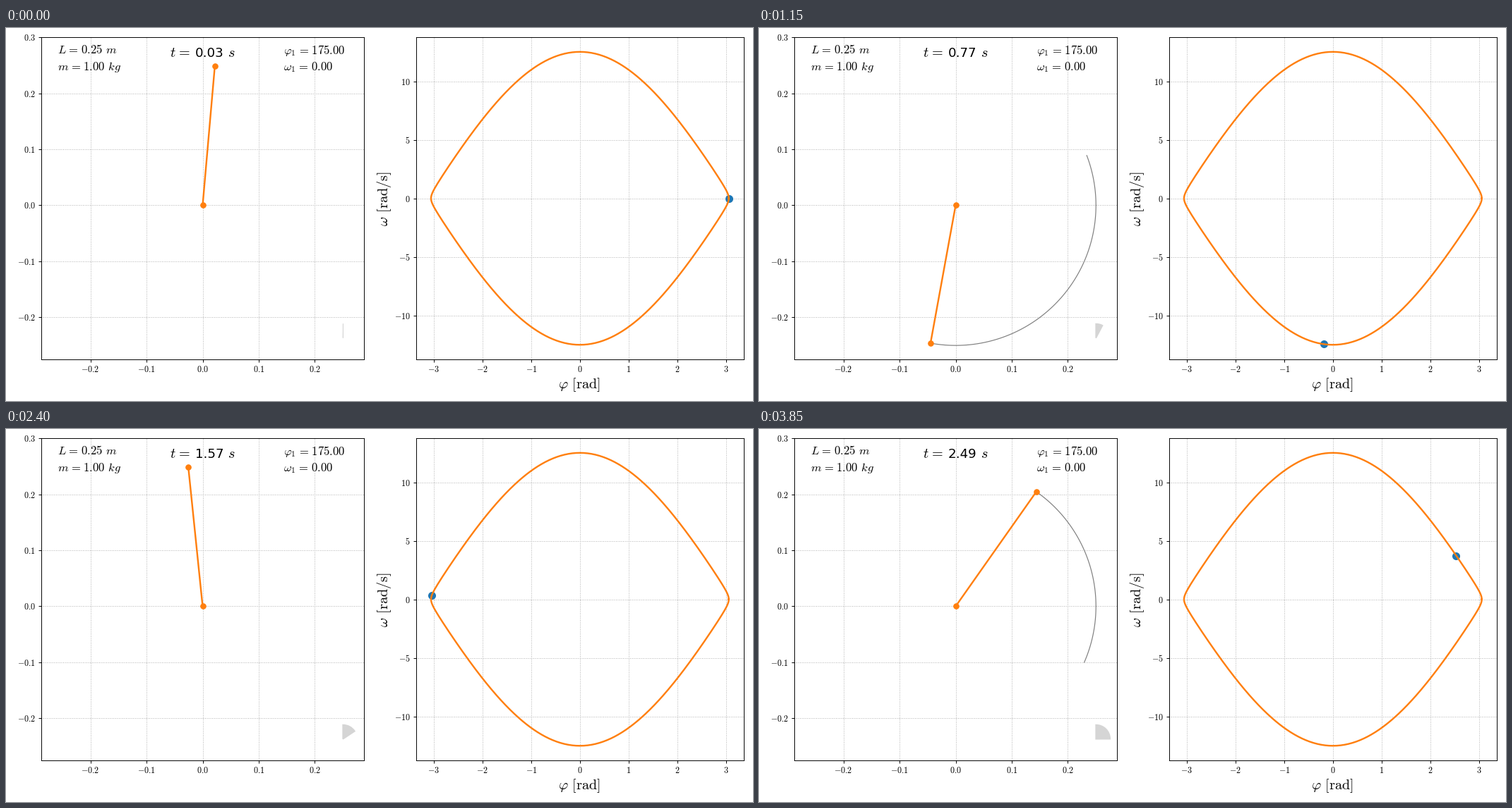
Recreate the animation shown at these times as a matplotlib script. Size 1058 px wide and 529 px high, loop 3.9 s.

```python
import numpy as np
import matplotlib.pyplot as plt
from matplotlib.animation import FuncAnimation
from matplotlib.patches import Wedge

W, H, DPI = 1058, 529, 64
FRAMES, INTERVAL = 78, 50
STEP, LEAD, TRAIL = 0.032, 0.03, 0.201  # seconds of simulated time
L, G, PHI0 = 0.25, 9.81, np.radians(175)
ORANGE, BLUE = "#ff7f0e", "#1f77b4"
EQ = r"\hspace{0.116}=\hspace{0.116}"
GAP = r"\hspace{0.38}"


def px(v):
    """Pixels to points."""
    return v * 72 / DPI


def swing(t_end, dt=0.001):
    """Pendulum angle and angular speed by Runge-Kutta steps."""
    def rate(s):
        return np.array([s[1], -G / L * np.sin(s[0])])

    t = np.arange(0, t_end + dt, dt)
    states = np.empty((len(t), 2))
    s = np.array([PHI0, 0.0])
    for n in range(len(t)):
        states[n] = s
        k1 = rate(s)
        k2 = rate(s + dt / 2 * k1)
        k3 = rate(s + dt / 2 * k2)
        k4 = rate(s + dt * k3)
        s = s + dt / 6 * (k1 + 2 * k2 + 2 * k3 + k4)
    return t, states[:, 0], states[:, 1]


def tip(phi):
    return L * np.sin(phi), -L * np.cos(phi)


plt.rcParams["mathtext.fontset"] = "cm"
fig = plt.figure(figsize=(W / DPI, H / DPI), dpi=DPI, facecolor="white")


def label(x, y, s, size, **kw):
    """Text with its baseline at stage pixel (x, y)."""
    return fig.text(x / W, 1 - y / H, s, fontsize=px(size),
                    va=kw.pop("va", "baseline"), **kw)


def formula(x, y, s, size, **kw):
    return label(x, y, f"${s}$", size, **kw)


def make_axes(x0, x1, xlim, ylim, xticks, yticks, fmt):
    top, bottom = 13.05, 470.06
    ax = fig.add_axes([x0 / W, 1 - bottom / H, (x1 - x0) / W, (bottom - top) / H])
    ax.set_xlim(xlim)
    ax.set_ylim(ylim)
    ax.set_xticks(xticks, [f"${v:{fmt}}$" for v in xticks])
    ax.set_yticks(yticks, [f"${v:{fmt}}$" for v in yticks])
    ax.tick_params(length=px(4.2), pad=px(4.2), width=px(0.96), labelsize=px(12))
    ax.grid(linestyle=":", linewidth=px(0.96), color="#b0b0b0")
    ax.set_axisbelow(True)
    for spine in ax.spines.values():
        spine.set_linewidth(px(0.96))
    return ax


w_max = np.sqrt(2 * G / L * (1 - np.cos(PHI0)))
left = make_axes(49.95, 507.05, (-0.2875, 0.2875), (-0.275, 0.3),
                 [k / 10 for k in range(-2, 3)],
                 [k / 10 for k in range(-2, 4)], ".1f")
right = make_axes(580.9, 1044.8, (-1.1 * PHI0, 1.1 * PHI0),
                  (-1.1 * w_max, 1.1 * w_max),
                  list(range(-3, 4)), list(range(-10, 11, 5)), "d")

formula(72.6, 36.5, "L" + EQ + "0.25" + GAP + "m", 16.6)
formula(72.6, 59.7, "m" + EQ + "1.00" + GAP + "kg", 16.6)
formula(393, 36.5, r"\varphi_1" + EQ + "175.00", 16.6)
formula(393, 59.7, r"\omega_1" + EQ + "0.00", 16.6)
formula(812, 510.7, r"\varphi" + GAP + r"\mathrm{[rad]}", 20.2, ha="center")
formula(547.5, 242, r"\omega" + GAP + r"\mathrm{[rad/s]}", 20.4,
        ha="right", va="center", rotation=90)
formula(232, 40.6, "t" + EQ, 20.2)
formula(314.2, 40.6, "s", 20.2)
clock = label(288, 40.6, "", 18.2, ha="center", family="DejaVu Sans")

# Closed orbit of constant energy
a = np.linspace(0, 2 * np.pi, 721)
orbit = PHI0 * np.cos(a)
speed = np.sqrt(np.maximum(0, 2 * G / L * (np.cos(orbit) - np.cos(PHI0))))
right.plot(orbit, np.sign(np.sin(a)) * speed, color=ORANGE, lw=px(2.4), zorder=2)
dot, = right.plot([], [], "o", color=BLUE, ms=px(10), mew=px(1), zorder=1.5)

trail, = left.plot([], [], color="0.5", lw=px(1.2), zorder=2)
rod, = left.plot([], [], "o-", color=ORANGE, lw=px(2.4), ms=px(7.4),
                 mew=px(1.2), zorder=3)
pie = Wedge((0.25, -0.2367), 0.0251, 89, 90, color="#d5d5d5", zorder=1.5)
left.add_patch(pie)

times, phis, omegas = swing(FRAMES * STEP)


def update(i):
    t = i * STEP
    phi = np.interp(t, times, phis)
    x, y = tip(phi)
    rod.set_data([0, x], [0, y])
    dot.set_data([phi], [np.interp(t, times, omegas)])
    past = np.linspace(max(0, t - TRAIL), t, 120)
    trail.set_data(*tip(np.interp(past, times, phis)))

    shown = t + LEAD
    clock.set_text(f"{shown:.2f}")
    pie.set_theta1(90 - 36 * shown)
    pie.set_linewidth(px(min(1.8, 0.8 + i)))
    return rod, dot, trail, clock, pie


anim = FuncAnimation(fig, update, frames=FRAMES, interval=INTERVAL,
                     init_func=lambda: update(0), repeat=True, repeat_delay=0)
plt.show()
```
